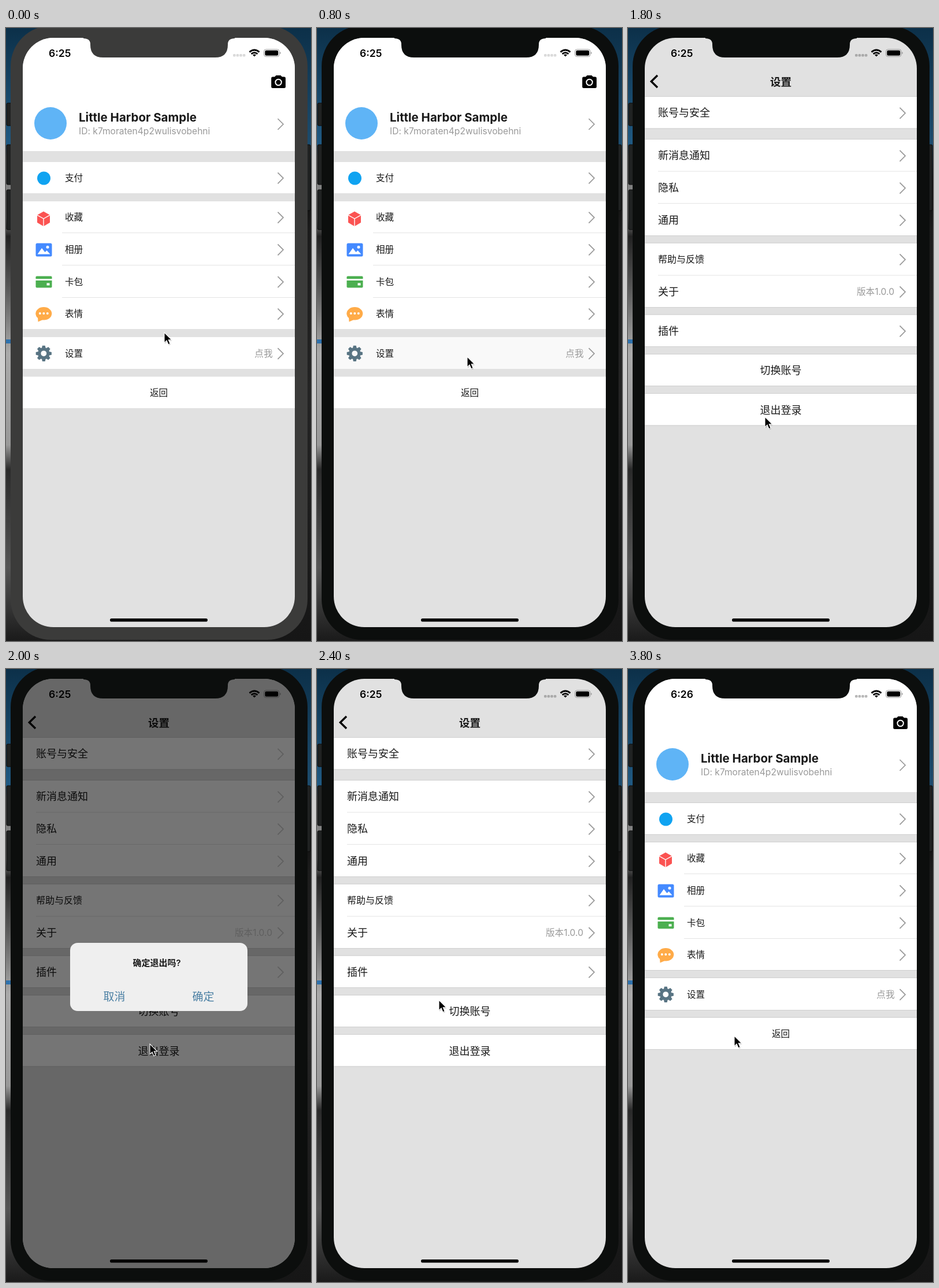
Recreate the animation shown at these times as an HTML page. Size 528 by 1061 pixels, loop 4000 ms.

```html
<!DOCTYPE html>
<html lang="zh-CN">
<head>
<meta charset="utf-8">
<title>Settings demo</title>
<style>
html, body { margin: 0; width: 100%; height: 100%; overflow: hidden; background: #111; }
svg { display: block; width: 100%; height: 100%; }
text { font-family: Inter, "Noto Sans CJK SC", "Noto Sans CJK", sans-serif; fill: #191919; }
.mid { text-anchor: middle; }
.end { text-anchor: end; }
.muted { fill: #999; }
.chev { fill: none; stroke: #999; stroke-width: 1.7; }
.edge { stroke: #cfcfcf; }
.rule { stroke: #e4e4e4; }
.dim .muted { fill: #cfcfcf; }
.dim .chev { stroke: #cfcfcf; }
</style>
</head>
<body>
<svg viewBox="0 0 528 1061" preserveAspectRatio="none">
  <defs>
    <clipPath id="screen"><rect x="29" y="17" width="471" height="1020" rx="53"/></clipPath>
    <linearGradient id="leftBg" x2="0" y2="1">
      <stop offset="0" stop-color="#0c3049"/><stop offset=".19" stop-color="#205a83"/>
      <stop offset=".21" stop-color="#777"/><stop offset=".31" stop-color="#8a8a8a"/>
      <stop offset=".34" stop-color="#222"/><stop offset=".42" stop-color="#555"/>
      <stop offset=".53" stop-color="#aaa"/><stop offset=".68" stop-color="#999"/>
      <stop offset=".72" stop-color="#2a2a2a"/><stop offset=".88" stop-color="#555"/>
      <stop offset="1" stop-color="#1a1a1a"/>
    </linearGradient>
    <linearGradient id="rightBg" x2="0" y2="1">
      <stop offset="0" stop-color="#0c3049"/><stop offset=".19" stop-color="#1d4c6d"/>
      <stop offset=".25" stop-color="#0b0b0b"/><stop offset=".33" stop-color="#1c1c1c"/>
      <stop offset=".6" stop-color="#242424"/><stop offset="1" stop-color="#161616"/>
    </linearGradient>
  </defs>

  <rect width="264" height="1061" fill="url(#leftBg)"/>
  <rect x="264" width="264" height="1061" fill="url(#rightBg)"/>
  <rect y="539" width="8" height="7" fill="#2f72ad"/>
  <g fill="#202222" stroke="#0a0a0a">
    <rect x="1" y="130" width="10" height="39" rx="2"/>
    <rect x="1" y="202" width="10" height="69" rx="2"/>
    <rect x="1" y="280" width="10" height="69" rx="2"/>
    <rect x="518" y="202" width="9" height="114" rx="2"/>
  </g>
  <rect class="bezel" x="8" y="-4" width="514" height="1063" rx="70"/>

  <g id="view" clip-path="url(#screen)">
    <rect x="29" y="17" width="471" height="1020" fill="#e1e1e1"/>
    <g id="home"></g>
    <g id="settings"></g>
    <text id="clock" x="74" y="49.5" font-size="17.5" font-weight="600" style="fill:#000"></text>
    <g id="signal">
      <rect x="393" y="45" width="4.6" height="4.6" rx="1.5"/><rect x="398.6" y="45" width="4.6" height="4.6" rx="1.5"/>
      <rect x="404.2" y="45" width="4.6" height="4.6" rx="1.5"/><rect x="409.8" y="45" width="4.6" height="4.6" rx="1.5"/>
    </g>
    <g fill="none" stroke="#000" stroke-width="2.7">
      <path d="M421.5 41.6Q430 34.4 438.5 41.6M424.6 44.9Q430 40.4 435.4 44.9"/>
      <path d="M427 46.6Q430 44.3 433 46.6L430 49.6Z" fill="#000" stroke="none"/>
    </g>
    <rect x="446.5" y="37" width="26.5" height="12.5" rx="3.6" fill="none" stroke="#999"/>
    <rect x="448.3" y="38.8" width="22.9" height="8.9" rx="2.2"/>
    <path d="M474.3 41Q477 43.2 474.3 45.5Z" fill="#888"/>
    <rect x="180" y="1022" width="169" height="5.6" rx="2.8"/>
    <g id="dialog">
      <rect x="29" y="17" width="471" height="1020" fill-opacity=".54"/>
      <rect x="111" y="474" width="307" height="118" rx="13" fill="#efefef"/>
      <text class="mid" x="261" y="513.5" font-size="15" font-weight="600">确定退出吗?</text>
      <text class="mid" x="187.5" y="574" font-size="19" style="fill:#4a7fa3">取消</text>
      <text class="mid" x="341.5" y="574" font-size="19" style="fill:#4a7fa3">确定</text>
    </g>
  </g>
  <path class="bezel" d="M134 18V10H396V18Q384 18 384 28V29Q384 51 362 51H168Q146 51 146 29V28Q146 18 134 18Z"/>

  <g id="cursor">
    <path d="M1 2V19.5L5 15.7L7.8 22.3L11 21L8.2 14.5H13.5Z" opacity=".22"/>
    <path d="M0 0V17.8L4.1 14L6.9 20.7L10.1 19.4L7.3 12.8H12.9Z" stroke="#fff" stroke-width="1.1"/>
  </g>
</svg>
<script>
const $ = id => document.getElementById(id);

const panel = (y0, y1) =>
  `<rect x="29" y="${y0}" width="471" height="${y1 - y0}" fill="#fff"/>
   <path class="edge" d="M29 ${y0 - .5}H500M29 ${y1 + .5}H500"/>`;
const rule = (x, y) => `<path class="rule" d="M${x} ${y}H500"/>`;
const chevron = y => `<path class="chev" d="M470.5 ${y - 9.5}L480 ${y}L470.5 ${y + 9.5}"/>`;
// y is the middle of the glyphs
const label = (x, y, size, str, cls = '', extra = '') =>
  `<text x="${x}" y="${y + size * .38}" font-size="${size}" class="${cls}" ${extra}>${str}</text>`;
const row = (x, y, size, str) => label(x, y, size, str) + chevron(y + .8);

function gear(cx, cy) {
  let teeth = '';
  for (let a = 0; a < 360; a += 45)
    teeth += `<path d="M-3.4 -9L-2.4 -13.6H2.4L3.4 -9Z" transform="rotate(${a})"/>`;
  return `<g transform="translate(${cx} ${cy})" fill="#587483">${teeth}
    <circle r="7.6" fill="none" stroke="#587483" stroke-width="5.4"/></g>`;
}

const icons = `
  <circle cx="77" cy="165" r="28" fill="#5fb4f6"/>
  <circle cx="65.5" cy="260" r="11.5" fill="#10a3f1"/>
  <path d="M65 317.5L76 323.7V336.8L65 343.3L54 336.8V323.7Z" fill="#fb5352"/>
  <path d="M54 323.9L65 330L76 323.9M65 330V344" fill="none" stroke="#fff" stroke-width="1.4"/>
  <rect x="51.5" y="372.5" width="28" height="23" rx="2.5" fill="#448aff"/>
  <path d="M54.5 391.5L62 381L67.5 388L70.5 385L76.5 391.5Z" fill="#fff"/>
  <circle cx="72" cy="379.3" r="2.5" fill="#fff"/>
  <rect x="51.5" y="429.5" width="28" height="20" rx="1.8" fill="#4caf50"/>
  <path d="M51 434.3H80V437H51ZM70.5 441.5H75.5V445.5H70.5Z" fill="#fff"/>
  <path d="M55 500L55.5 508.5L66 504Z" fill="#ffab48"/>
  <ellipse cx="65.3" cy="494.3" rx="14" ry="11.2" fill="#ffab48"/>
  <g fill="#fff"><circle cx="58.8" cy="494" r="2"/><circle cx="65.3" cy="494" r="2"/><circle cx="71.8" cy="494" r="2"/></g>
  ${gear(65.3, 563.3)}
  <path d="M467.5 82H475.5L478 84.6H481.5Q484 84.6 484 87V101.5Q484 104 481.5 104H461.7Q459.2 104 459.2 101.5V87Q459.2 84.6 461.7 84.6H465.2Z"/>
  <circle cx="471.6" cy="94" r="5.2" fill="none" stroke="#fff" stroke-width="2"/>`;

$('home').innerHTML =
  '<rect x="29" y="17" width="471" height="196" fill="#fff"/>' +
  panel(232, 286) + panel(300, 521) + panel(535, 590) + panel(603.5, 658) +
  '<rect id="pressed" x="29" y="535" width="471" height="55" fill="#f9f9f9"/>' +
  [354.5, 410.5, 466.5].map(y => rule(97, y)).join('') + icons +
  label(126, 154.5, 20.5, 'Little Harbor Sample', '', 'font-weight="700"') +
  label(126, 178.3, 15.6, 'ID: k7moraten4p2wulisvobehni', 'muted') + chevron(166.5) +
  [['支付', 259], ['收藏', 327.3], ['相册', 383], ['卡包', 438.8], ['表情', 494.3], ['设置', 562.8]]
    .map(([str, y]) => row(102, y, 15.6, str)).join('') +
  label(461.5, 562.8, 15.6, '点我', 'muted end') +
  label(264.5, 631, 15.6, '返回', 'mid');

$('settings').innerHTML =
  panel(119, 173.5) + panel(193, 359) + panel(372.5, 483) +
  panel(496.5, 551) + panel(565, 619) + panel(633, 687.5) +
  [248, 303.5, 428].map(y => rule(52, y)).join('') +
  '<path d="M51 82L40.3 92.5L51 103" fill="none" stroke="#000" stroke-width="3.4"/>' +
  label(264.5, 93, 18.6, '设置', 'mid', 'font-weight="600"') +
  [['账号与安全', 146.5], ['新消息通知', 220.5], ['隐私', 276.3], ['通用', 332], ['帮助与反馈', 400, 16],
   ['关于', 456], ['插件', 524]].map(([str, y, size = 18]) => row(52, y, size, str)).join('') +
  label(461, 456, 15.6, '版本1.0.0', 'muted end') +
  label(264.5, 592.5, 18, '切换账号', 'mid') +
  label(264.5, 661, 18, '退出登录', 'mid');

// pointer path: time, x, y
const path = [
  [0, 274, 527], [200, 271, 541], [400, 264, 572], [800, 260, 569], [1600, 262, 562],
  [1800, 237, 673], [2000, 249, 649], [2200, 207, 577], [2400, 211, 573], [2600, 60, 130],
  [2800, 46, 96], [3000, 159, 348], [3200, 172, 572], [3400, 184, 635], [4000, 184, 635]
];

function pointer(t) {
  const i = path.findIndex(p => p[0] > t);
  const [t0, x0, y0] = path[i - 1], [t1, x1, y1] = path[i];
  const k = (t - t0) / (t1 - t0);
  return [x0 + (x1 - x0) * k, y0 + (y1 - y0) * k];
}

const show = (el, on) => el.setAttribute('display', on ? 'inline' : 'none');
const edges = document.querySelectorAll('#home .edge');
const bezels = document.querySelectorAll('.bezel');

function draw(now) {
  const t = Math.floor(now % 4000 / 200) * 200;
  const inSettings = t >= 1000 && t < 3000;
  const asking = t >= 2000 && t < 2400;
  show($('home'), !inSettings);
  show($('settings'), inSettings);
  show($('dialog'), asking);
  show($('signal'), !asking);
  show($('pressed'), t === 800);
  edges.forEach(e => show(e, t >= 3000));
  bezels.forEach(b => b.setAttribute('fill', t < 800 ? '#3b3b3a' : '#0c0e0d'));
  $('view').setAttribute('class', asking ? 'dim' : '');
  $('signal').setAttribute('fill', t < 1000 ? '#dadada' : inSettings ? '#a9a9a9' : '#b8b8b8');
  $('clock').textContent = t < 3600 ? '6:25' : '6:26';
  $('cursor').setAttribute('transform', `translate(${pointer(t)})`);
}

const start = performance.now();
function loop() {
  draw(performance.now() - start);
  requestAnimationFrame(loop);
}
loop();
</script>
</body>
</html>
```
